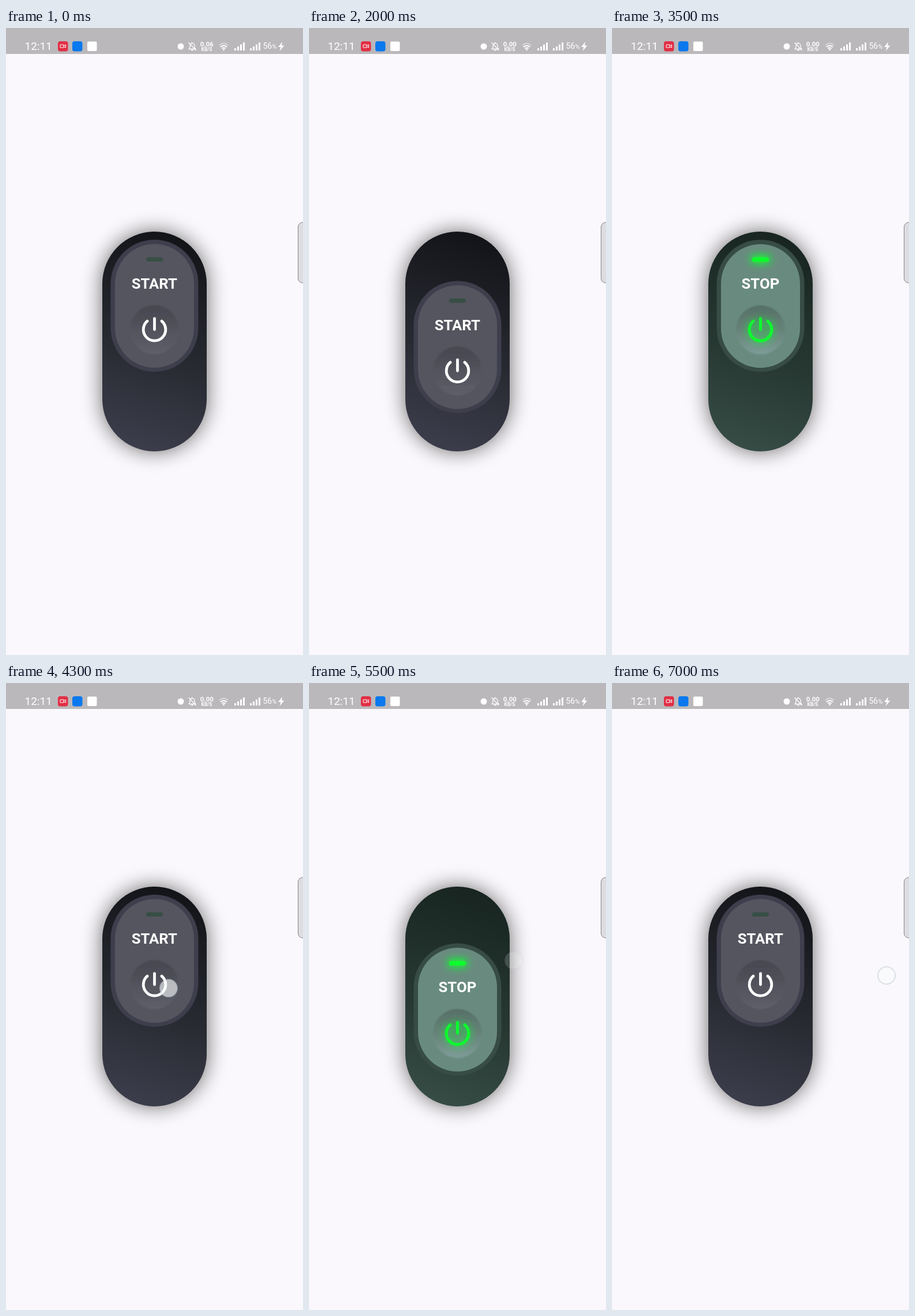
Animation, 515 px wide and 1087 px high, one loop 7.1 s. Source, as an HTML page:

```html
<!DOCTYPE html>
<html lang="en">
<head>
<meta charset="utf-8">
<title>Start / stop switch</title>
<style>
  html, body { margin: 0; width: 100%; height: 100%; overflow: hidden; background: #faf8fc; }
  svg {
    display: block; width: 100vw; height: 100vh;
    font-family: Roboto, sans-serif;
    --body-top: #121418; --body-mid: #292b33; --body-end: #3c3d4b;
    --rim: #3e3e4c; --face: #555560;
    --dish-top: #474750; --dish-mid: #53535d; --dish-end: #5f5f6a;
    --led: #374e45; --icon: #fff;
  }
  svg.on {
    --body-top: #182520; --body-mid: #273832; --body-end: #364c44;
    --rim: #374c45; --face: #698b7f;
    --dish-top: #566f67; --dish-mid: #668379; --dish-end: #7e9c98;
    --led: #0cff2c; --icon: #0cff2c;
  }
  .glow { visibility: hidden; }
  .on .glow { visibility: visible; }
  .line { fill: none; stroke-linecap: round; stroke-linejoin: round; }
</style>
</head>
<body>
<svg id="stage" viewBox="0 0 515 1087">
  <defs>
    <linearGradient id="bodyFill" x1=".58" y1="0" x2=".42" y2="1">
      <stop stop-color="var(--body-top)"/>
      <stop offset=".58" stop-color="var(--body-mid)"/>
      <stop offset="1" stop-color="var(--body-end)"/>
    </linearGradient>
    <linearGradient id="dishFill" x1="0" y1="0" x2="0" y2="1">
      <stop stop-color="var(--dish-top)"/>
      <stop offset=".5" stop-color="var(--dish-mid)"/>
      <stop offset="1" stop-color="var(--dish-end)"/>
    </linearGradient>
    <filter id="shadow" filterUnits="userSpaceOnUse" x="90" y="270" width="335" height="550">
      <feGaussianBlur stdDeviation="18"/>
    </filter>
    <filter id="halo" filterUnits="userSpaceOnUse" x="190" y="360" width="135" height="230">
      <feGaussianBlur stdDeviation="7"/>
    </filter>
    <filter id="soft" x="-10%" y="-10%" width="120%" height="120%">
      <feGaussianBlur stdDeviation=".8"/>
    </filter>
    <path id="power" d="M245 508.1A19.3 19.3 0 1 0 270 508.1M257.5 503.6V522.8"/>
    <path id="bars" d="M0 35h3v4h-3zM5 32h3v7h-3zM10 28.5h3v10.5h-3zM15 25h3v14h-3z"/>
  </defs>

  <rect width="515" height="1087" fill="#faf8fc"/>

  <g id="statusBar" fill="#fff">
    <rect width="515" height="45" fill="#bab8bb"/>
    <text x="32.5" y="38" font-size="19">12:11</text>
    <rect x="90" y="23" width="17.5" height="17.5" rx="4" fill="#e22f45"/>
    <path class="line" stroke="#fff" d="M94.500 29h5.500v5h-5.500zM100.500 30.500l3-1.500v5l-3-1.500"/>
    <rect x="115" y="23" width="17.5" height="17.5" rx="4" fill="#0a78ee"/>
    <rect x="141" y="23.5" width="16.5" height="16.5" rx="2"/>
    <circle cx="303" cy="32" r="5.5"/>
    <path class="line" stroke="#fff" stroke-width="1.3"
      d="M317 36.5h12l-2-3v-3a4 4 0 0 0-8 0v3zM321.5 38.5h3M322.5 25v1M317 25.5l12 13"/>
    <g text-anchor="middle" font-weight="700">
      <text id="speed" x="348.3" y="32" font-size="11.5"></text>
      <text x="348" y="40" font-size="8.3">KB/S</text>
    </g>
    <g class="line" stroke="#fff" stroke-width="2">
      <path d="M370.5 29.5q7-6 14 0" opacity=".45"/>
      <path d="M372.5 32.5q5-4 10 0M375 35.2q2.5-2 5 0"/>
    </g>
    <circle cx="377.5" cy="37.5" r="1.5"/>
    <use href="#bars" x="396"/>
    <use href="#bars" x="423"/>
    <text x="445.5" y="36" font-size="14">56<tspan font-size="11">%</tspan></text>
    <path d="M479 24l-7 9h4.5l-2 7 8-9.5h-4.5z"/>
  </g>

  <rect x="506.5" y="337" width="20" height="105" rx="8" fill="#dddce0" stroke="#858388"/>

  <rect x="167" y="353" width="181" height="381" rx="90.5" opacity=".58" filter="url(#shadow)"/>
  <rect x="167" y="353" width="181" height="381" rx="90.5" fill="url(#bodyFill)"/>

  <g id="knob">
    <rect x="181.5" y="367" width="152" height="229" rx="76" fill="var(--rim)"/>
    <rect x="189" y="374.5" width="137" height="214.5" rx="68.5" fill="var(--face)"/>
    <circle cx="257.5" cy="523" r="42.5" fill="url(#dishFill)" filter="url(#soft)"/>
    <g class="glow" filter="url(#halo)">
      <rect x="240" y="394" width="35" height="14" rx="7" fill="#0cff2c"/>
      <use href="#power" class="line" stroke="#0cff2c" stroke-width="5"/>
    </g>
    <rect x="243" y="397.5" width="29" height="7.5" rx="3.75" fill="var(--led)"/>
    <text id="label" x="257.4" y="452" font-size="25.7" font-weight="700" fill="#fff" text-anchor="middle"></text>
    <use href="#power" class="line" stroke="var(--icon)" stroke-width="4.8"/>
  </g>

  <circle id="touch" r="15" fill="#f8fafa" fill-opacity=".68" stroke="#c0ccd4" stroke-opacity=".55" stroke-width="2"/>
</svg>

<script>
const LOOP = 7100, STEP = 100, TRAVEL = 123, SWIPE = 154;
const [stage, knob, label, speed, touch] =
  ['stage', 'knob', 'label', 'speed', 'touch'].map(id => document.getElementById(id));

// Each swipe alternately pulls the knob down and up, and flips the switch when its span ends
const swipes = [
  { press: 1400, span: 1000, drift: 8 },
  { press: 3000, span: 600, drift: 10 },
  { press: 4200, span: 600, drift: 8 },
  { press: 5200, span: 600, drift: 74 }
];

function smooth(x) {
  const p = Math.min(Math.max(x, 0), 1);
  return p * p * (3 - 2 * p);
}

function placeTouch(x, y, opacity) {
  touch.setAttribute('transform', `translate(${x} ${y})`);
  touch.setAttribute('opacity', opacity);
}

function draw(time) {
  let offset = 0, on = false;
  placeTouch(476, 507, time >= 6800 ? 1 : 0);

  swipes.forEach(({ press, span, drift }, i) => {
    const progress = (time - press) / span;
    const direction = i % 2 ? -1 : 1;
    offset += direction * TRAVEL * smooth((progress - .295) / .55);
    if (progress >= 1) on = !on;
    if (progress >= 0 && progress <= .5) {
      const pull = (progress * 2) ** 2;
      const startY = direction > 0 ? 512 : 635;
      placeTouch(281 + drift * pull, startY + direction * SWIPE * pull, 1 - .75 * pull);
    }
  });

  stage.classList.toggle('on', on);
  label.textContent = on ? 'STOP' : 'START';
  speed.textContent = time < 1700 ? '0.06' : '0.00';
  knob.setAttribute('transform', `translate(0 ${offset})`);
}

const start = performance.now();
function tick() {
  const time = (performance.now() - start) % LOOP;
  draw(Math.floor(time / STEP) * STEP);
  requestAnimationFrame(tick);
}
tick();
</script>
</body>
</html>
```
